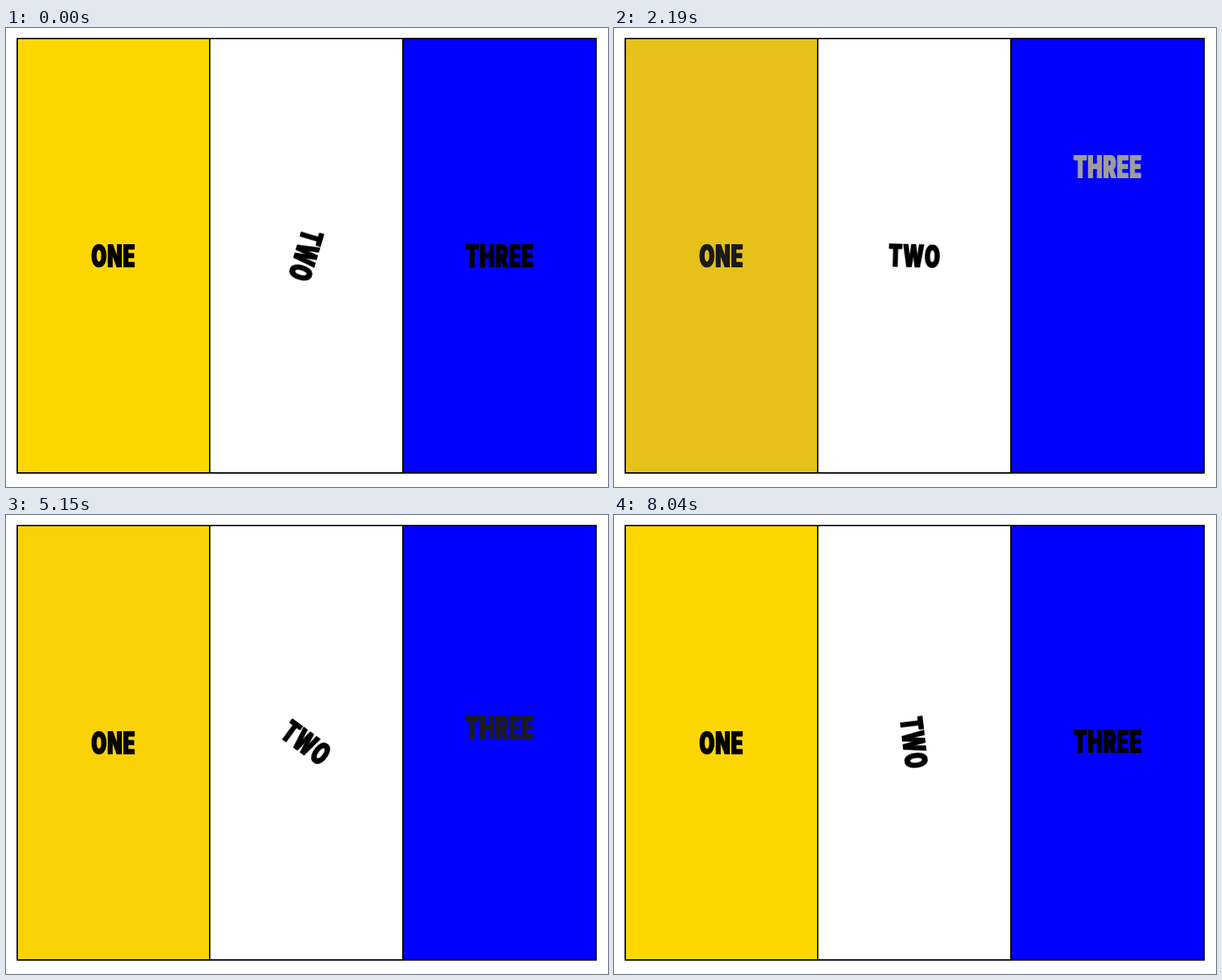
Recreate the animation shown at these times as an HTML page. Size 857x654 px, loop 8070 ms.

```html
<!DOCTYPE html>
<html lang="en">
<head>
<meta charset="utf-8">
<title>One Two Three</title>
<style>
html, body { margin: 0; width: 100%; height: 100%; overflow: hidden; background: #fff; }
div {
  position: absolute; top: 14px; width: 277px; height: 621px; padding-bottom: 1px;
  box-sizing: border-box; border: 2px solid #000;
  display: flex; align-items: center; justify-content: center;
}
#one { left: 15px; width: 276px; }
#two { left: 289px; }
#three { left: 564px; background: #00f; }
/* heavy condensed lettering: the side shadows thicken only the upright stems */
b {
  font: 900 46px/1 Inter, "Liberation Sans", sans-serif;
  font-optical-sizing: none; font-kerning: none; white-space: nowrap;
  letter-spacing: 2px; margin-right: -2px; transform-origin: calc(50% - 1px) 50%;
  scale: .6 1; text-shadow: 1.4px 0, -1.4px 0;
}
</style>
</head>
<body>
<div id="one"><b>ONE</b></div>
<div id="two"><b>TWO</b></div>
<div id="three"><b>THREE</b></div>
<script>
const LOOP = 8070, CYCLE = 2706;
const anims = [];

// Every leg between two stops eases on its own.
function move(selector, prop, values, offsets, delay = 0) {
  const frames = values.map((value, i) => ({
    [prop]: value,
    offset: offsets ? offsets[i] : i / (values.length - 1),
    easing: 'ease'
  }));
  const anim = document.querySelector(selector)
    .animate(frames, { duration: CYCLE, iterations: Infinity, delay });
  anim.pause();
  anims.push(anim);
}

move('#one', 'backgroundColor', ['#ffd700', '#00f', '#ffd700']);
move('#one b', 'color', ['#000', '#fff', '#000']);
move('#two b', 'rotate', ['0deg', '360deg'], null, -0.2 * CYCLE);
move('#three b', 'translate', ['0 0', '0 205.5px', '0 -205.5px', '0 0'], [0, .25, .75, 1]);
move('#three b', 'color', ['#000', '#fff', '#000', '#fff', '#000']);

const start = performance.now();
function draw() {
  const time = (performance.now() - start) % LOOP;
  for (const anim of anims) anim.currentTime = time;
  requestAnimationFrame(draw);
}
draw();
</script>
</body>
</html>
```
